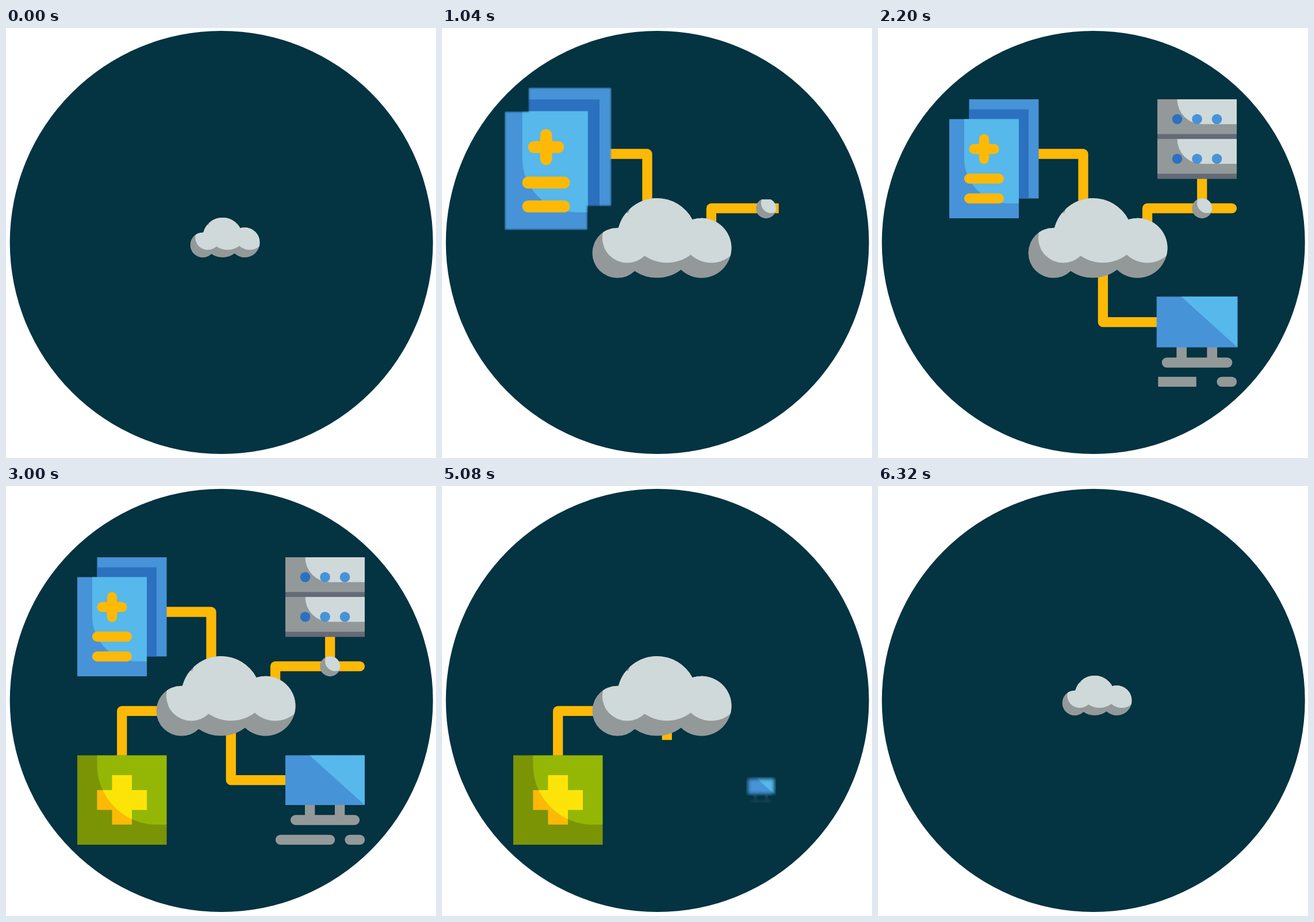
An HTML page for the animation above (6600 ms loop, 748 px wide and 748 px high).

```html
<!DOCTYPE html>
<html lang="en">
<head>
<meta charset="utf-8">
<title>Cloud network</title>
<style>
  html, body { margin: 0; width: 100%; height: 100%; overflow: hidden; background: #fff; }
  svg { display: block; width: 100vw; height: 100vh; }
  .wire { fill: none; stroke: #fdb906; stroke-width: 17.3; stroke-linecap: round; stroke-linejoin: round; }
  .bar { fill: none; stroke: #939999; stroke-width: 17.3; stroke-linecap: round; }
  .gray { fill: #939999; }
  .slate { fill: #646a77; }
  .pale { fill: #cfd9da; }
  .blue { fill: #4793d7; }
  .navy { fill: #2c71bf; }
  .sky { fill: #56b8eb; }
</style>
</head>
<body>
<svg viewBox="0 0 748 748">
  <defs id="defs">
    <clipPath id="cloudShape">
      <circle cx="305" cy="391.3" r="43.5"/><circle cx="374" cy="365.3" r="69.3"/><circle cx="451.5" cy="382.7" r="52"/>
    </clipPath>
    <clipPath id="greenLight"><path d="M158.5 468.5H279.5V589H262A103.5 103.5 0 0 1 158.5 486Z"/></clipPath>
    <path id="cross" d="M184.5 503H219V529H245V563.5H219V589H184.5V563.5H158.5V529H184.5Z"/>
    <g id="rack">
      <path class="gray" d="M486 124H624V185H486Z"/>
      <path class="pale" d="M520.5 124H624V167.300H563.500A43 43 0 0 1 520.500 124Z"/>
      <path class="slate" d="M486 184.500H624V193.500H486Z"/>
      <circle class="navy" cx="520.500" cy="158.500" r="8.800"/>
      <circle class="blue" cx="555" cy="158.500" r="8.800"/>
      <circle class="blue" cx="589.500" cy="158.500" r="8.800"/>
    </g>
  </defs>

  <circle cx="374.700" cy="373" r="368" fill="#043341"/>

  <path id="wireDocs" class="wire" d="M357 330V219H279"/>
  <path id="wireServer" class="wire" d="M468.500 350V313.700H615.500"/>
  <path id="wireStub" class="wire" d="M563.700 313V255"/>
  <path id="wireMonitor" class="wire" d="M391.300 410V511.700H486"/>
  <path id="wireGreen" class="wire" d="M280 391.300H201.700V468.500"/>

  <g id="knob">
    <clipPath id="knobShape"><circle cx="563.700" cy="313.700" r="17.500"/></clipPath>
    <circle class="gray" cx="563.700" cy="313.700" r="17.500"/>
    <circle class="pale" cx="572.500" cy="304.500" r="17.500" clip-path="url(#knobShape)"/>
  </g>

  <g id="docs">
    <path class="blue" d="M158.500 124H279.500V296.500H158.500Z"/>
    <path class="navy" d="M158.500 141.500H262V296.500H158.500Z"/>
    <path class="blue" d="M124 158.500H245V331H124Z"/>
    <path class="sky" d="M150 158.500H245V305H228A78 78 0 0 1 150 227Z"/>
    <path class="wire" d="M184.500 193V228M167 210.500H202M158.500 262H210.500M158.500 296.500H210.500"/>
  </g>

  <g id="server">
    <use href="#rack"/><use href="#rack" y="69"/>
  </g>

  <g id="monitor">
    <path class="gray" d="M520 550H537.300V577H520ZM572 550H589.300V577H572Z"/>
    <path class="bar" d="M503.500 581H606.500"/>
    <path class="blue" d="M486 468.500H624V555H486Z"/>
    <path class="sky" d="M528 468.500H624V555Z"/>
  </g>
  <path id="barLeft" class="bar" d="M477.500 615.300H563.500"/>
  <path id="barRight" class="bar" d="M598 615.300H615.500"/>

  <g id="green">
    <path fill="#7a9406" d="M124 468.500H279.500V624H124Z"/>
    <use href="#cross" fill="#fdb906"/>
    <g clip-path="url(#greenLight)">
      <path fill="#94b706" d="M124 468.500H279.500V624H124Z"/>
      <use href="#cross" fill="#fde408"/>
    </g>
  </g>

  <g id="cloud">
    <g clip-path="url(#cloudShape)">
      <path class="gray" d="M250 280H520V450H250Z"/>
      <g class="pale">
        <circle cx="322.300" cy="365" r="43.500"/><circle cx="391.300" cy="339" r="69.300"/><circle cx="468.500" cy="356.500" r="52"/>
      </g>
    </g>
  </g>
</svg>
<script>
const LOOP = 6600, STEP = 40;
const byId = id => document.getElementById(id);
const progress = (t, start, end) => Math.min(1, Math.max(0, (t - start) / (end - start)));
const smooth = p => (1 - Math.cos(Math.PI * p)) / 2;
const rise = p => Math.sin(p * Math.PI / 2);

// box: x, y, width, height; from: the side where the reveal begins
const wipes = [
  { id: 'wireDocs', box: [265, 205, 105, 130], from: 'right', enter: [480, 740], leave: [4680, 4840] },
  { id: 'wireServer', box: [455, 300, 170, 60], from: 'left', enter: [840, 1100], leave: [4800, 5040] },
  { id: 'wireStub', box: [550, 240, 30, 80], from: 'bottom', enter: [1060, 1180], leave: [4760, 4920] },
  { id: 'knob', box: [545, 295, 38, 37], from: 'bottom', enter: [940, 1050], leave: [4840, 5000] },
  { id: 'wireMonitor', box: [380, 400, 120, 125], from: 'top', enter: [1640, 1840], leave: [4920, 5160] },
  { id: 'wireGreen', box: [190, 380, 100, 100], from: 'right', enter: [2260, 2520], leave: [5780, 5960] },
  { id: 'barLeft', box: [467, 605, 107, 21], from: 'center', enter: [2110, 2255], leave: [4840, 5000] },
  { id: 'barRight', box: [588, 605, 38, 21], from: 'center', enter: [1940, 2060], leave: [4840, 5000] }
];
const zooms = [
  { id: 'docs', center: [201.7, 227.5], enter: 740, leave: [4700, 5000] },
  { id: 'server', center: [555, 193], enter: 1060, leave: [4740, 5080] },
  { id: 'monitor', center: [555, 529], enter: 1740, leave: [4780, 5160] },
  { id: 'green', center: [201.7, 546.3], enter: 2500, leave: [5360, 5900] }
];

for (const { id } of wipes) {
  byId('defs').insertAdjacentHTML('beforeend',
    `<clipPath id="${id}Clip"><rect id="${id}Rect"/></clipPath>`);
  byId(id).setAttribute('clip-path', `url(#${id}Clip)`);
}
for (const { id } of zooms) {
  byId('defs').insertAdjacentHTML('beforeend',
    `<filter id="${id}Soft" x="-5%" y="-5%" width="110%" height="110%" color-interpolation-filters="sRGB">
      <feMorphology id="${id}Erode" in="SourceAlpha" operator="erode"/>
      <feGaussianBlur id="${id}Blur" result="core"/>
      <feComposite in="SourceGraphic" in2="core" operator="in"/>
    </filter>`);
}

function setScale(id, [x, y], s) {
  byId(id).setAttribute('transform', `translate(${x} ${y}) scale(${s}) translate(${-x} ${-y})`);
}

function drawWipe({ id, box: [x, y, w, h], from, enter, leave }, t) {
  const p = progress(t, ...enter) - progress(t, ...leave);
  const vertical = from === 'top' || from === 'bottom';
  const width = vertical ? w : w * p;
  const height = vertical ? h * p : h;
  const left = from === 'right' ? x + w - width : from === 'center' ? x + (w - width) / 2 : x;
  const top = from === 'bottom' ? y + h - height : y;
  Object.entries({ x: left, y: top, width, height })
    .forEach(([name, value]) => byId(id + 'Rect').setAttribute(name, value));
}

function drawZoom({ id, center, enter, leave }, t) {
  const peak = enter + 300;
  const fall = smooth(progress(t, peak, peak + 200));
  const out = progress(t, ...leave);
  const scale = t < peak ? 1.2 * rise(progress(t, enter, peak)) : 1.2 - 0.2 * fall - out * out;
  const node = byId(id);
  node.style.display = scale > 0.02 ? '' : 'none';
  setScale(id, center, Math.max(scale, 0.02));
  // Edges look soft while a piece is growing or shrinking.
  const softness = (out > 0 ? 1 : 1 - fall) * Math.min(8, 1.7 / (scale * scale + 0.01));
  if (softness > 0.3) {
    node.setAttribute('filter', `url(#${id}Soft)`);
    byId(id + 'Erode').setAttribute('radius', softness);
    byId(id + 'Blur').setAttribute('stdDeviation', softness);
  } else node.removeAttribute('filter');
}

function cloudScale(t) {
  if (t < 280) return 0.5 + 0.7 * rise(t / 280);
  if (t < 5960) return 1.2 - 0.2 * smooth(progress(t, 280, 480));
  if (t < 6040) return 1 + 0.2 * rise((t - 5960) / 80);
  return 1.2 - 0.7 * progress(t, 6040, 6320);
}

function frame() {
  const t = Math.floor(performance.now() % LOOP / STEP) * STEP;
  wipes.forEach(item => drawWipe(item, t));
  zooms.forEach(item => drawZoom(item, t));
  setScale('cloud', [379.5, 363.5], cloudScale(t));
  requestAnimationFrame(frame);
}
frame();
</script>
</body>
</html>
```
